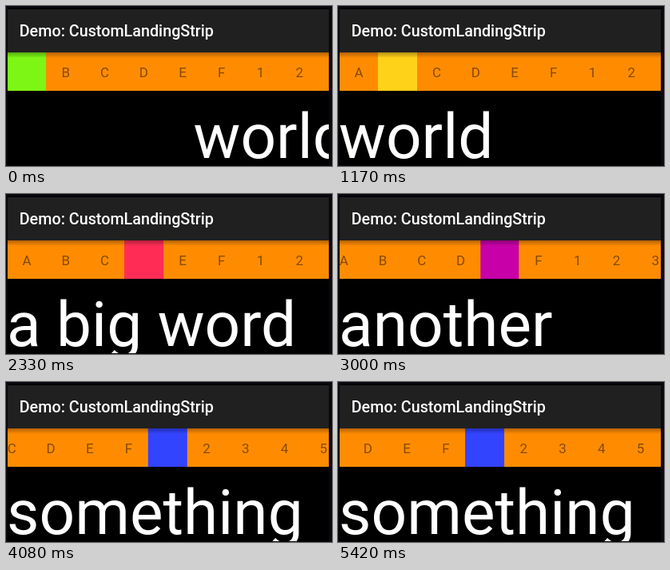
These frames come from a looping animation (408 by 200 pixels, 5510 ms). An HTML page:

```html
<!DOCTYPE html>
<html lang="en">
<head>
<meta charset="utf-8">
<title>Demo: CustomLandingStrip</title>
<style>
  html, body { margin: 0; width: 100%; height: 100%; overflow: hidden; background: #08080e; }
  svg { display: block; width: 408px; height: 200px; font-family: Roboto, sans-serif; }
  .title { font-size: 19.75px; font-weight: 500; fill: #fff; }
  .labels { font-size: 17px; fill: #000; fill-opacity: .48; text-anchor: middle; }
  .pages { font-size: 78.4px; fill: #fff; }

  .pages, .strip, .tab { animation: 5510ms linear infinite; }
  .pages { animation-name: swipe; animation-timing-function: cubic-bezier(.35, 0, .2, 1); }
  .strip { animation-name: scroll; animation-timing-function: ease-in-out; }
  .tab { opacity: 0; shape-rendering: crispEdges; }
  .a { animation-name: tab-a; fill: #7df615; }
  .b { animation-name: tab-b; fill: #ffd21a; }
  .c { animation-name: tab-c; fill: #ff6520; }
  .d { animation-name: tab-d; fill: #ff2d55; }
  .e { animation-name: tab-e; fill: #c800a8; }
  .f { animation-name: tab-f; fill: #8028d4; }
  .g { animation-name: tab-g; fill: #3344ff; }

  /* one page is 404px wide */
  @keyframes swipe {
    0% { transform: translateX(-170.5px); animation-timing-function: ease-in-out; }
    9.07%, 14.16% { transform: translateX(0); }
    20.33%, 21.78% { transform: translateX(-404px); }
    28.31%, 31.22% { transform: translateX(-808px); }
    39.93%, 43.56% { transform: translateX(-1212px); }
    52.27%, 55.17% { transform: translateX(-1616px); }
    62.61%, 63.88% { transform: translateX(-2020px); }
    72.23%, 100% { transform: translateX(-2424px); }
  }
  /* keeps the selected tab centred, then a drag to the end */
  @keyframes scroll {
    0%, 46.82% { transform: translateX(0); }
    51.36%, 57.71% { transform: translateX(-18.7px); }
    62.25%, 66.42% { transform: translateX(-67.4px); }
    70.96%, 81.67% { transform: translateX(-116.2px); }
    95.28%, 100% { transform: translateX(-134.9px); }
  }
  @keyframes tab-a {
    0%, 15.97% { opacity: 1; }
    20.5%, 100% { opacity: 0; }
  }
  @keyframes tab-b {
    0%, 15.97% { opacity: 0; }
    20.5%, 24.32% { opacity: 1; }
    29.76%, 100% { opacity: 0; }
  }
  @keyframes tab-c {
    0%, 24.32% { opacity: 0; }
    29.76%, 34.48% { opacity: 1; }
    39.02%, 100% { opacity: 0; }
  }
  @keyframes tab-d {
    0%, 34.48% { opacity: 0; }
    39.02%, 46.82% { opacity: 1; }
    51.36%, 100% { opacity: 0; }
  }
  @keyframes tab-e {
    0%, 46.82% { opacity: 0; }
    51.36%, 57.71% { opacity: 1; }
    62.25%, 100% { opacity: 0; }
  }
  @keyframes tab-f {
    0%, 57.71% { opacity: 0; }
    62.25%, 66.42% { opacity: 1; }
    70.96%, 100% { opacity: 0; }
  }
  @keyframes tab-g {
    0%, 66.42% { opacity: 0; }
    70.96%, 100% { opacity: 1; }
  }
</style>
</head>
<body>
<svg viewBox="0 0 408 200">
  <defs>
    <clipPath id="screen"><rect x="2" y="0" width="402" height="199"/></clipPath>
    <linearGradient id="shade" x2="0" y2="1">
      <stop offset="0" stop-opacity=".3"/>
      <stop offset="1" stop-opacity="0"/>
    </linearGradient>
  </defs>
  <g clip-path="url(#screen)">
    <rect y="3" width="408" height="197"/>
    <rect y="4" width="408" height="54" fill="#202020"/>
    <text class="title" x="16.7" y="38">Demo: CustomLandingStrip</text>

    <rect y="58" width="408" height="48" fill="#ff8c00"/>
    <g class="strip">
      <text class="labels" y="89" x="26 74.75 123.5 172.25 221 269.75 318.5 367.25 416 464.75 513.5">ABCDEF12345</text>
      <rect class="tab a" x="1.7" y="58" width="48.75" height="48"/>
      <rect class="tab b" x="50.45" y="58" width="48.75" height="48"/>
      <rect class="tab c" x="99.2" y="58" width="48.75" height="48"/>
      <rect class="tab d" x="147.95" y="58" width="48.75" height="48"/>
      <rect class="tab e" x="196.7" y="58" width="48.75" height="48"/>
      <rect class="tab f" x="245.45" y="58" width="48.75" height="48"/>
      <rect class="tab g" x="294.2" y="58" width="48.75" height="48"/>
    </g>
    <rect y="58" width="408" height="7" fill="url(#shade)"/>

    <g class="pages">
      <text x="1" y="190">hello</text>
      <text x="405" y="190">world</text>
      <text x="809" y="190">foo</text>
      <text x="1213" y="190">a big word</text>
      <text x="1617" y="190">another</text>
      <text x="2021" y="190">something</text>
      <text x="2425" y="190">something</text>
    </g>
  </g>
</svg>
</body>
</html>
```
